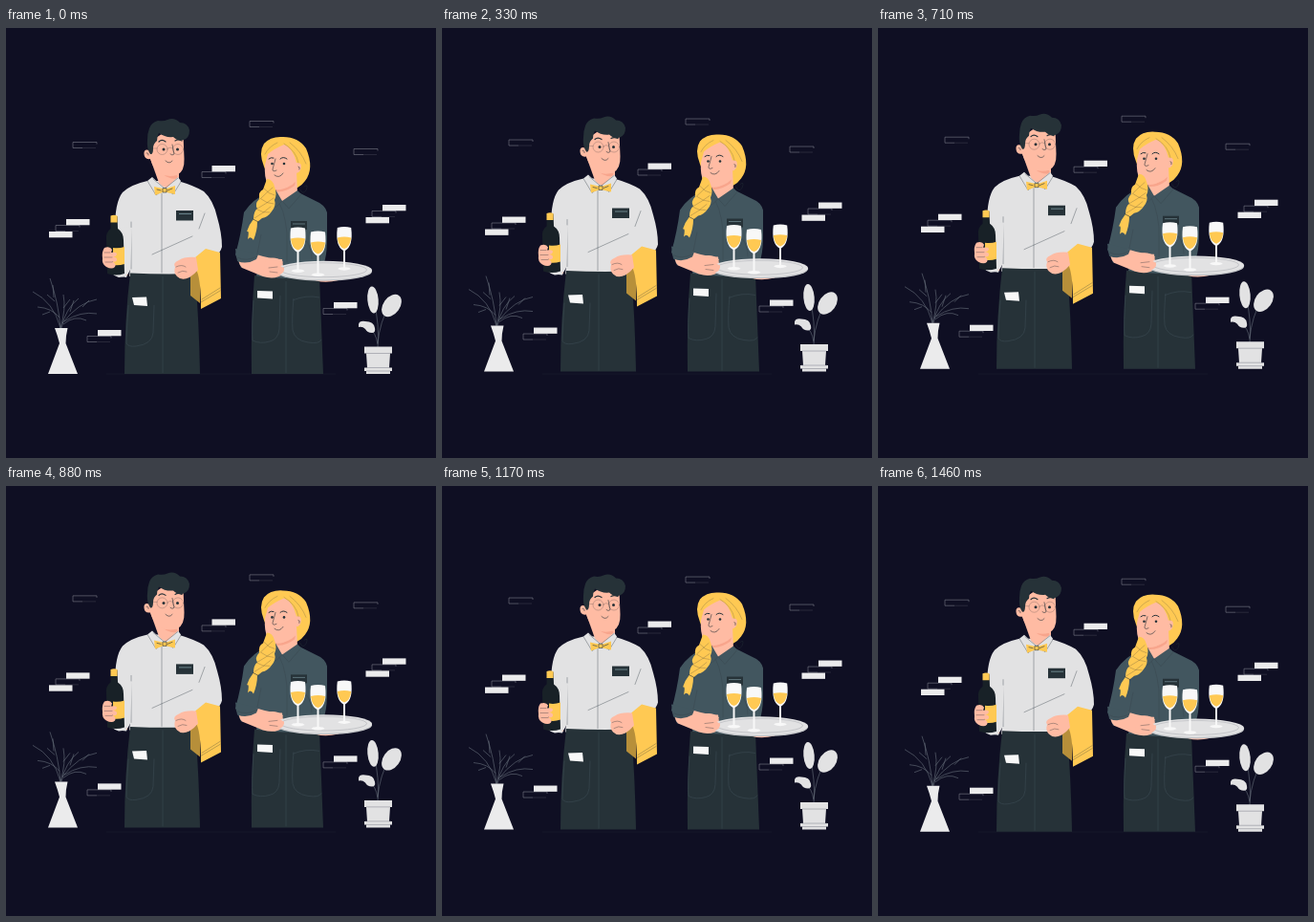
Animation, 450 px wide and 450 px high, one loop 1.5 s. Source, as an HTML page:

```html
<!DOCTYPE html>
<html lang="en">
<head>
<meta charset="utf-8">
<title>Waiters</title>
<style>
  html, body { margin: 0; width: 100%; height: 100%; overflow: hidden; background: #0f0f23; }
  svg { display: block; width: 100vw; height: 100vh; }
  .light { fill: #e2e2e3; }
  .bright { fill: #ebebec; }
  .white { fill: #f8f8f8; }
  .dark { fill: #263238; }
  .teal { fill: #42565f; }
  .skin { fill: #ffbba3; }
  .shade { fill: #f8a58c; }
  .gold { fill: #ffc953; }
  .deep { fill: #b78f3a; }
  .line { fill: none; stroke: #263238; stroke-width: .6; stroke-linecap: round; stroke-linejoin: round; }
  .soft { fill: none; stroke: #3c4a52; stroke-width: .6; }
  .twig { fill: none; stroke: #68717c; stroke-width: .6; }
  .frame { fill: none; stroke: #858791; stroke-width: .55; }
  .faint { opacity: .4; }
</style>
</head>
<body>
<svg viewBox="0 0 450 450">
  <defs>
    <g id="outline">
      <path class="frame" d="M10 6H0V0H25V2"/>
      <path class="frame faint" d="M10 6H24"/>
    </g>
    <g id="glass">
      <path class="white" d="M-7.500 0Q-10 20-1 25V43Q-6 43-7 45Q0 48 7 45Q6 43 1 43V25Q10 20 7.500 0Q0-2-7.500 0Z"/>
      <path class="gold" d="M-7.500 11Q0 9 7.500 11Q6.500 21 0 23Q-6.500 21-7.500 11Z"/>
    </g>
  </defs>

  <path d="M105 362H345" stroke="#1d2230" stroke-width=".5"/>

  <g id="scene">
    <g id="bricks"></g>

    <!-- Vase -->
    <path class="twig" d="M57 314Q55 288 46 262M57 314Q50 287 28 276M56 303Q48 293 33 292M57 314Q63 294 60 279M58 314Q62 294 76 283M59 309Q76 287 95 284M61 307Q78 296 95 299M60 310Q72 300 84 306M51 286L43 279M50 282L49 269M67 297L71 285M80 292L87 285M46 297L38 300M60 293L67 284"/>
    <path class="bright" d="M51 314H64.500Q62.500 322 62.500 330L75 362H44L56 330Q54 322 51 314Z"/>

    <!-- Potted plant -->
    <path class="twig" d="M389 335Q391 310 385 286M389 330Q391 308 402 288M389 331Q387 318 380 315"/>
    <g class="light">
      <ellipse cx="384" cy="284.500" rx="5.700" ry="14" transform="rotate(-5 384 284.500)"/>
      <ellipse cx="403.500" cy="290.500" rx="8.700" ry="13" transform="rotate(36 403.500 290.500)"/>
      <path d="M369 310Q370 306 376 307Q385 307 386 314Q387 319 383 319Q378 319 376 315Q373 312 369 313Z"/>
      <path d="M375 333.500H404V340.500H402L401 355.500H404V359H402V362H377V359H375V355.500H378L377 340.500H375Z"/>
    </g>
    <path class="frame" d="M377 340.500H402M376 355.500H403M377 359H402"/>

    <!-- Waiter -->
    <path class="light" d="M148 160Q130 164 122 172Q114 182 114 210L110 251Q114 260 126 261L130 251L129 260H199L201 250Q223 241 226 229Q226 215 221 198Q217 180 207 171Q197 165 180 160Z"/>
    <path class="line" d="M131 203V252M202 210L208 194M153 237L195 218M163 173V256" opacity=".6"/>
    <path class="dark" d="M130 256.500Q164 258 198 257Q202 307 203 362H124Q124 306 130 256.500Z"/>
    <path class="soft" d="M164 260V361M128 290Q126 319 126 330Q128 334 136 333Q153 331 154 319L155 290"/>
    <path class="white" d="M132 282L147 281.500L148 291L134 290Z"/>

    <path class="skin" d="M150 134L160 162Q164 167 169 167Q177 164 181 160V146Z"/>
    <path class="shade" d="M161 148Q168 154 179 154L180 158Q165 158 161 148Z"/>
    <path class="skin" d="M153 119Q150 121 150 128Q144 126 144.500 132Q145 138 151 137Q154 147 160 152Q169 157 179 154Q187 150 186.500 137L185.500 112Q167 103 153 119Z"/>
    <path class="dark" d="M151 132Q147 126 148 117Q148 110 150 105Q152 99 159 97Q165 98 169 96Q176 93 182 99Q190 99 192 107Q192 115 186 117Q180 119 175 114Q167 115 160 110Q158 114 158 118Q154 121 154 126Q154 133 151 132Z"/>
    <g class="line">
      <g stroke-width=".4" opacity=".6">
        <circle cx="163.500" cy="127" r="5.500"/>
        <circle cx="180" cy="127" r="5.500"/>
        <path d="M150 126H158M169 126Q172 124 174.500 126"/>
      </g>
      <path d="M174 122L176 132Q174 134 172 132M167 139Q171 143 174 139M147 131Q149 130 149 133"/>
      <path d="M160 119Q163 116 167 119M177 118Q180 116 184 118" stroke-width="1.200"/>
    </g>
    <g class="dark"><circle cx="165" cy="127" r="1.500"/><circle cx="179.500" cy="127" r="1.500"/></g>

    <path class="light" d="M148 160L153 156L166 168L157 175ZM167 168L180 156L183 160L176 174Z"/>
    <path class="line" d="M148 160L157 175L166 168L175 174L183 161M154 158L166 168L180 157" opacity=".6"/>
    <path class="gold" d="M155 166L164 168H168L177 165V174L168 172H164L156 175Z"/>
    <path class="line" d="M164 168V172H168V168ZM158 169L162 170M174 168L169 170"/>
    <path class="dark" d="M178 191H196V201.500H178Z"/>
    <path d="M181 194.500H194" stroke="#6c858c"/>

    <!-- Bottle and hand -->
    <path class="skin" d="M111 230L128 234L127 259Q115 259 110 251Z"/>
    <path class="light" d="M115 207L132 209L130 253Q127 261 118 261Q108 258 110 251Q115 234 115 207Z"/>
    <path fill="#182127" d="M109.500 197H116.500L117 210Q123 214 123 222L124 257Q115 260 106 257L105 222Q104 214 109.500 210Z"/>
    <path class="gold" d="M109.500 196.500Q113 195 116.500 196.500V203.500H109.500ZM112 230Q118 231 124 229V247Q118 249 112 248Z"/>
    <path class="skin" d="M103 230Q109 228 111 232L110 235Q116 234 116 237Q115 240 111 239Q117 240 116 243Q115 246 111 244Q116 247 114 250Q111 253 105 250Q100 247 101 241Q100 234 103 230Z"/>
    <path class="line" d="M103 235H109M103 240H111M104 245H111" opacity=".6"/>

    <!-- Towel and hand -->
    <path class="deep" d="M193 255L203 254V288L193 280Z"/>
    <path class="gold" d="M198 240L209 231L224 235L225 283L204 294Q204 265 200 255Z"/>
    <path class="line" d="M205 284L224 272M204 287L224 275" opacity=".5"/>
    <path class="skin" d="M199 240Q187 239 181 243Q174 246 177 250Q175 256 179 260Q184 265 192 261Q198 257 201 253Z"/>
    <path class="line" d="M178 250Q184 247 188 250M180 256Q185 253 189 255" opacity=".6"/>

    <!-- Waitress -->
    <path class="teal" d="M276 171Q258 179 249 193Q246 216 240 237L246 251L264 245L260 274H325L328 254Q336 247 336 220V193Q334 185 324 181L304 171Z"/>
    <path class="dark" d="M260 259Q293 265 328 260L332 362H257Q256 306 260 259Z"/>
    <path class="soft" d="M293 265V361M259 285Q257 316 258 327Q266 331 276 328Q285 326 286 315L287 280M301 283Q299 304 300 316Q302 327 316 329Q328 331 330 326M300 285Q314 279 328 282"/>
    <path class="white" d="M263 275L279 275.500V283.500L263 282.500Z"/>
    <path class="soft" d="M267 216L262 241M313 221Q320 230 320 242M283 180Q291 187 294 214V245"/>

    <path class="gold" d="M270 145Q264 130 270 121Q277 113 290 114Q306 114 314 126Q323 147 313 160Q304 173 284 169Q274 158 270 145Z"/>
    <path class="skin" d="M282 151L281 175Q287 183 294 181Q303 177 305 173L304 149Z"/>
    <path class="shade" d="M280 168Q294 170 303 161L302 165Q291 173 281 171Z"/>
    <path class="skin" d="M274 132Q281 126 291 122Q300 125 304 141Q311 140 308 149Q305 153 303 151Q302 164 291 168Q280 172 274 164Q270 156 271 143Z"/>
    <path class="line" d="M291 121Q304 129 306 141M297 120Q309 129 314 142M284 120Q275 124 271 132" opacity=".35"/>
    <g class="line">
      <path d="M282 137L279 148Q279 151 283 149M281 154Q286 158 290 152M306 145Q308 145 307 148"/>
      <path d="M275 137Q277 135 280 136M287 137Q290 134 294 137" stroke-width="1"/>
      <path d="M312 166Q317 162 314 170Q310 175 308 169" opacity=".7"/>
    </g>
    <g class="dark"><circle cx="278.500" cy="142" r="1.300"/><circle cx="291" cy="142" r="1.300"/></g>

    <path class="teal" d="M277 174L282 169L289 181L282 188ZM289 181L305 170L309 174L296 189Z"/>
    <path class="soft" d="M282 188L289 181L296 189L309 174"/>
    <path class="gold" d="M273 158Q279 158 281 166Q284 174 281 180Q283 186 278 192Q274 198 268 199L263 203Q263 212 259 222Q256 217 253 221Q255 211 252 213Q254 206 259 200Q259 192 263 189Q260 184 265 179Q264 171 269 169Z"/>
    <path class="line" d="M270 168Q275 174 281 175M279 167Q273 172 266 179M267 179Q273 184 280 184M280 178Q272 184 263 189M263 190Q269 194 276 193M277 187Q269 194 260 199" opacity=".4"/>
    <path class="line" d="M258.500 200L264 203" stroke-width="2"/>
    <path class="dark" d="M298 202H315V211H298Z"/>
    <path d="M300 205H313" stroke="#6c858c" stroke-width=".8"/>

    <!-- Tray -->
    <path class="skin" d="M244 236L262 237Q278 242 289 242L291 257Q282 264 269 260L247 251Q242 246 244 236Z"/>
    <path class="teal" d="M240 231L264 237L262 242Q252 248 242 244Z"/>
    <path class="soft" d="M242 240Q251 245 263 239"/>
    <path class="skin" d="M315 260Q328 269 348 264L352 258Z"/>
    <ellipse cx="332.500" cy="254.800" rx="50.500" ry="10" fill="#c3c5c8"/>
    <ellipse class="light" cx="332.500" cy="253.600" rx="50.500" ry="9.800"/>
    <ellipse class="frame" cx="332.500" cy="253.200" rx="45" ry="7.500" opacity=".6"/>
    <path class="skin" d="M272 242Q282 238 290 245L285 248L291 251Q292 257 284 259Q274 262 269 256Z"/>
    <path class="line" d="M275 251L284 250M276 255L284 256" opacity=".6"/>
    <use href="#glass" x="305.500" y="209.500"/>
    <use href="#glass" transform="translate(354 209) scale(.96)"/>
    <use href="#glass" x="326.500" y="213.500"/>
  </g>
</svg>
<script>
  const LOOP = 1500, LIFT = 5.6;
  const solid = [[63, 200], [45, 213], [215.500, 144], [394, 185], [376.500, 198], [96, 316], [343, 287]];
  const hollow = [[70, 119.500], [255, 97.500], [364, 126.500], [205, 150.500],
    [85, 322.500], [332, 293.500], [52, 206.500], [383, 191.500]];
  document.getElementById('bricks').innerHTML =
    hollow.map(([x, y]) => `<use href="#outline" x="${x}" y="${y}"/>`).join('') +
    solid.map(([x, y]) => `<rect class="bright" x="${x}" y="${y}" width="24.500" height="6.300"/>`).join('');

  const scene = document.getElementById('scene');
  function draw(now) {
    const phase = (now % LOOP) / LOOP;
    const y = -LIFT * (1 - Math.abs(1 - 2 * phase));
    scene.setAttribute('transform', `translate(0 ${y.toFixed(3)})`);
    requestAnimationFrame(draw);
  }
  draw(performance.now());
</script>
</body>
</html>
```
